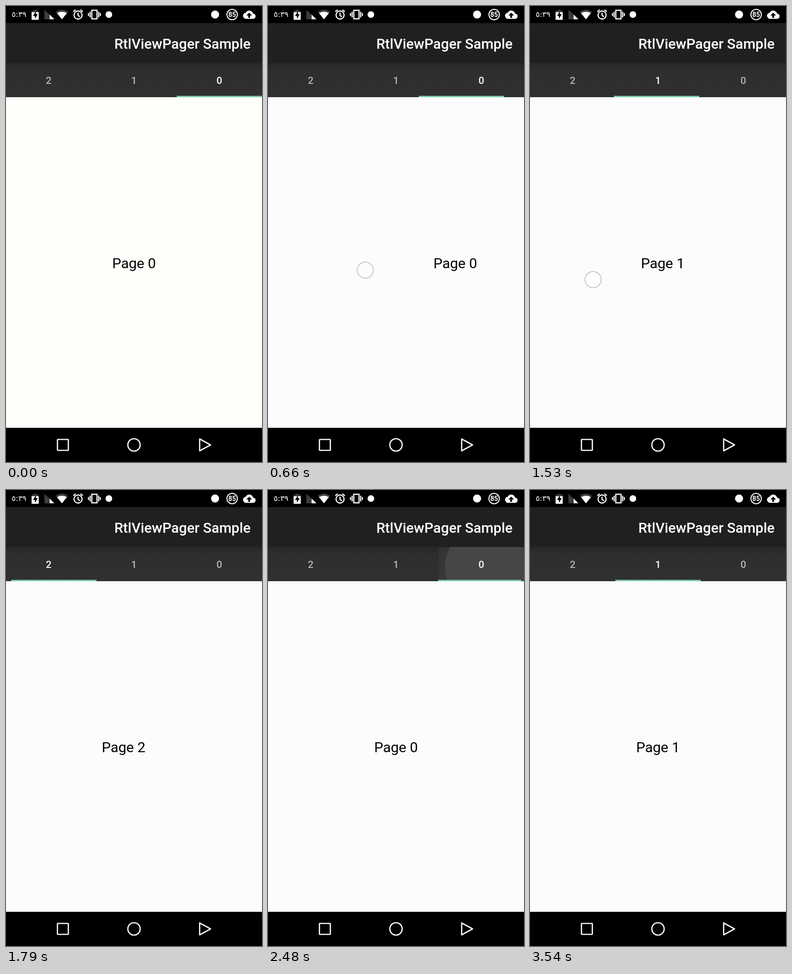
Recreate the animation shown at these times as an HTML page. Size 540x960 px, loop 3620 ms.

```html
<!DOCTYPE html>
<html lang="en">
<head>
<meta charset="utf-8">
<title>RtlViewPager Sample</title>
<style>
  html, body { margin: 0; width: 100%; height: 100%; overflow: hidden; background: #000; }
  svg { display: block; width: 540px; height: 960px; }
  text { font-family: Roboto, sans-serif; }
  .title { font-size: 29.8px; font-weight: 500; fill: #fff; }
  .tab { font-size: 21px; font-weight: 500; fill: #fff; text-anchor: middle; }
  .page { font-size: 30px; text-anchor: middle; }
  .line { fill: none; stroke: #fff; stroke-width: 2.4; }
  .nav { fill: none; stroke: #f4f4f0; stroke-width: 2.7; stroke-linejoin: round; }
</style>
</head>
<body>
<svg viewBox="0 0 540 960">
  <defs>
    <linearGradient id="tabShade" x1="0" y1="0" x2="0" y2="1">
      <stop offset="0" stop-color="#282828"/>
      <stop offset=".25" stop-color="#2e2e2e"/>
      <stop offset="1" stop-color="#303030"/>
    </linearGradient>
    <clipPath id="tabClip"><rect id="clipRect" y="120" width="180" height="72"/></clipPath>
  </defs>

  <rect width="540" height="960"/>
  <rect id="content" y="192" width="540" height="696"/>
  <g id="pages"></g>

  <rect y="36" width="540" height="85" fill="#202021"/>
  <rect y="120" width="540" height="72" fill="url(#tabShade)"/>
  <g clip-path="url(#tabClip)">
    <rect id="highlight" y="120" width="180" height="72" fill="#505050"/>
    <circle id="ripple" fill="#464646"/>
  </g>
  <text class="title" x="516" y="90" text-anchor="end">RtlViewPager Sample</text>
  <g id="tabs"></g>
  <rect id="indicator" y="189" height="3" fill="#78cba6"/>

  <!-- status bar -->
  <g fill="#fff">
    <text x="12" y="23" font-size="16" style="font-family:'DejaVu Sans',sans-serif">٥:٣٩</text>
    <path d="M58 8h7v2h4v4H54v-4h4z" fill="#3c3c3c"/>
    <path d="M54 13h15v16H54z"/>
    <path d="M63 11l-6 10h4v6l6-10h-4z" fill="#000"/>
    <path d="M81 8v20h21z" fill="#3c3c3c"/>
    <path d="M92 18v10h10z"/>
    <path d="M118 28L105 12Q118 3 131 12z" fill="#3c3c3c"/>
    <path d="M118 28L107.500 15Q118 9 128.500 15z"/>
    <g class="line">
      <circle cx="152" cy="19" r="8.500"/>
      <path d="M152 14v6l4 2.500M142 12l5-4M162 12l-5-4"/>
      <path d="M181 9h11v18h-11zM177.500 12v12M195.500 12v12M174 15v6M199 15v6"/>
      <circle cx="477" cy="18" r="11" stroke-width="2"/>
    </g>
    <circle cx="217" cy="18" r="7"/>
    <circle cx="441" cy="18" r="8.500"/>
    <text x="477" y="23" font-size="14" font-weight="700" text-anchor="middle">85</text>
    <path d="M507 27a6.500 6.500 0 0 1-1-13a8 8 0 0 1 15 2a5.500 5.500 0 0 1 0 11z"/>
    <path d="M513 14l-6 6h4v5h4v-5h4z" fill="#000"/>
  </g>

  <!-- navigation bar -->
  <g class="nav">
    <rect x="108.500" y="912.500" width="23" height="23" rx="1"/>
    <circle cx="270" cy="924" r="13"/>
    <path d="M408.500 911.500v25l23-12.500z"/>
  </g>

  <circle id="pointer" r="17" stroke-width="2"/>
</svg>

<script>
const LOOP = 3620, STEP = 20, LAG = 25, WIDTH = 540, TAB = 180, SLOP = 23;
const swipes = [
  { from: 0, down: 320, move: 440, up: 740, x: 57, travel: 332, power: 2.6, y: 556, settle: 550 },
  { from: 1, down: 1430, move: 1480, up: 1595, x: 100, travel: 273, power: 2, y: 576, settle: 460 }
];
const taps = [
  { from: 2, to: 0, down: 2170, up: 2243, x: 467, y: 167, scroll: 300 },
  { from: 0, to: 1, down: 2940, up: 3025, x: 287, y: 167, scroll: 200 }
];

const $ = id => document.getElementById(id);
const clamp = v => Math.min(1, Math.max(0, v));
const lerp = (a, b, p) => a + (b - a) * p;
const progress = (t, start, length) => clamp((t - start) / length);
const remaining = (t, start, length) => (1 - progress(t, start, length)) ** 5;
const latest = (list, t) => list.filter(g => t >= g.down).pop();
const set = (el, attrs) => Object.entries(attrs).forEach(([k, v]) => el.setAttribute(k, v));

// cubic-bezier(.4, 0, .2, 1)
function fastOutSlowIn(x) {
  let lo = 0, hi = 1;
  for (let i = 0; i < 20; i++) {
    const s = (lo + hi) / 2, r = 1 - s;
    if (1.2 * r * r * s + .6 * r * s * s + s ** 3 < x) lo = s; else hi = s;
  }
  return lo * lo * (3 - 2 * lo);
}

function addText(parent, className, y, label) {
  const el = document.createElementNS("http://www.w3.org/2000/svg", "text");
  set(el, { class: className, y });
  el.textContent = label;
  $(parent).append(el);
  return el;
}
const pages = [0, 1, 2].map(i => addText("pages", "page", 552, "Page " + i));
const tabs = [0, 1, 2].map(i => addText("tabs", "tab", 164, i));
tabs.forEach((el, i) => el.setAttribute("x", 450 - TAB * i));

const touchX = (s, t) => s.x + s.travel * progress(t, s.move, s.up - s.move) ** s.power;

function swipePosition(s, t) {
  const drag = Math.max(0, touchX(s, t) - s.x - SLOP) / WIDTH;
  return s.from + 1 - (1 - drag) * remaining(t, s.up, s.settle);
}

function pagePosition(t) {
  const tap = latest(taps, t), swipe = latest(swipes, t);
  if (tap) return lerp(tap.to, tap.from, remaining(t, tap.up, tap.scroll));
  return swipe ? swipePosition(swipe, t) : 0;
}

function indicatorEdges(t) {
  const home = i => 360 - TAB * i;
  const tap = latest(taps, t);
  if (!tap) {
    // while a page settles, the bar trails it slightly
    const swipe = latest(swipes, t);
    const lag = swipe && t > swipe.up + LAG ? LAG : 0;
    const left = home(pagePosition(t - lag));
    return [left, left + TAB];
  }
  const p = fastOutSlowIn(progress(t, tap.up, 300));
  const left = home(tap.to);
  if (t < tap.up) return [home(tap.from), home(tap.from) + TAB];
  // a jump over several tabs grows the bar from just beside its goal
  const jump = Math.abs(tap.from - tap.to) > 1;
  const start = jump ? [left - 36, left - 36] : [home(tap.from), home(tap.from) + TAB];
  return [lerp(start[0], left, p), lerp(start[1], left + TAB, p)];
}

function drawRipple(t) {
  const tap = latest(taps, t);
  const tabX = tap ? 360 - TAB * tap.to : 0;
  const age = tap ? t - tap.up : -1;
  const p = 1 - (1 - clamp(age / 345)) ** 2;
  set($("clipRect"), { x: tabX });
  set($("highlight"), {
    x: tabX,
    opacity: tap ? .22 * progress(t, tap.down, 80) * (1 - progress(age, 280, 240)) : 0
  });
  set($("ripple"), {
    cx: tap ? lerp(tap.x, tabX + 90, p * .4) : 0,
    cy: tap ? lerp(tap.y, 155.5, p * .4) : 0,
    r: 97 * p,
    opacity: age >= 0 ? 1 - progress(age, 240, 260) : 0
  });
}

function drawPointer(t) {
  const touch = latest([...swipes, ...taps], t);
  const onTab = touch && "to" in touch;
  set($("pointer"), {
    cx: touch ? (onTab ? touch.x : touchX(touch, t)) : 0,
    cy: touch ? touch.y : 0,
    fill: onTab ? "rgba(165,165,175,.5)" : "rgba(255,255,255,.3)",
    stroke: onTab ? "none" : "#c9c9c6",
    opacity: touch ? 1 - progress(t, touch.up + 100, 80) : 0
  });
}

function render(now) {
  const t = Math.floor((now % LOOP) / STEP) * STEP;
  const position = pagePosition(t);
  const done = latest([...swipes, ...taps].filter(g => t >= g.up), t);
  const selected = done ? ("to" in done ? done.to : done.from + 1) : 0;
  const [left, right] = indicatorEdges(t);

  pages.forEach((el, i) => el.setAttribute("x", 270 + Math.round(WIDTH * (position - i))));
  tabs.forEach((el, i) => el.setAttribute("opacity", i === selected ? 1 : .65));
  set($("content"), { fill: t < 320 ? "#fefefa" : "#fcfcfe" });
  set($("indicator"), {
    x: Math.round(left),
    width: Math.round(right) - Math.round(left)
  });
  drawRipple(t);
  drawPointer(t);
  requestAnimationFrame(render);
}
render(performance.now());
</script>
</body>
</html>
```
